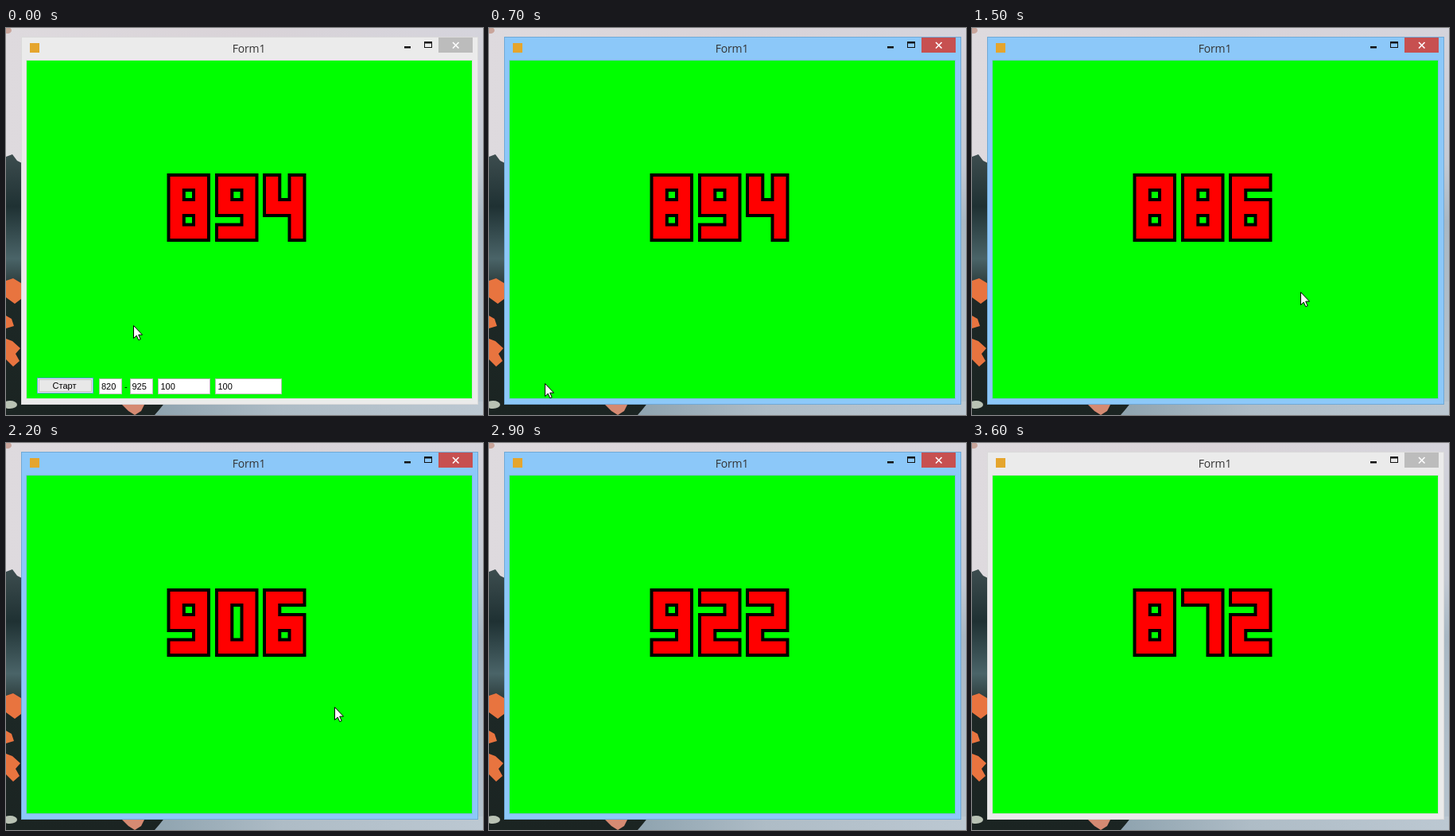
These frames come from a looping animation (600x487 px, 3.7 s). An HTML page:

```html
<!DOCTYPE html>
<html lang="ru">
<head>
<meta charset="utf-8">
<title>Form1</title>
<style>
  html, body { margin: 0; width: 100%; height: 100%; overflow: hidden; background: #d6d4da; }
  svg { display: block; width: 600px; height: 487px; }
  text { font: 11px "Liberation Sans", Arial, sans-serif; fill: #000; }
  .title { font: 14px "Open Sans", "Noto Sans", sans-serif; letter-spacing: -.2px; fill: #333; text-anchor: middle; }
  .frame { fill: #ebebeb; stroke: #dadada; }
  .client { fill: #0f0; stroke: #dedede; }
  .close { fill: #bcbcbc; }
  .active .frame { fill: #8cc8f9; stroke: #70a9d6; }
  .active .client { stroke: #7fbce6; }
  .active .close { fill: #c75050; }
  #digits path { fill: #f00; fill-rule: evenodd; stroke: #000; stroke-width: 4; }
  .box { fill: #fff; stroke: #b4bcb4; }
</style>
</head>
<body>
<svg viewBox="0 0 600 487">
  <defs>
    <linearGradient id="sky" x1="0" x2="1" y1="0" y2="0">
      <stop offset="0" stop-color="#dedade"/>
      <stop offset=".5" stop-color="#d9d3d8"/>
      <stop offset="1" stop-color="#d5d4dc"/>
    </linearGradient>
    <linearGradient id="sea" x1="0" x2="0" y1="0" y2="1">
      <stop offset="0" stop-color="#d5d4dc"/>
      <stop offset=".35" stop-color="#c3c9d3"/>
      <stop offset=".5" stop-color="#a9b8c4"/>
      <stop offset="1" stop-color="#b6c3ce"/>
    </linearGradient>
    <linearGradient id="water" x1="0" x2="1" y1="0" y2="0">
      <stop offset="0" stop-color="#8da2ae"/>
      <stop offset=".4" stop-color="#aebcc6"/>
      <stop offset="1" stop-color="#bcc8d2"/>
    </linearGradient>
    <linearGradient id="shore" x1="0" x2="0" y1="0" y2="1">
      <stop offset="0" stop-color="#3d4d4f"/>
      <stop offset=".2" stop-color="#1f3133"/>
      <stop offset=".4" stop-color="#4a6468"/>
      <stop offset=".55" stop-color="#1d2826"/>
      <stop offset="1" stop-color="#1b2422"/>
    </linearGradient>
  </defs>

  <rect width="600" height="487" fill="url(#sky)"/>
  <rect x="590" width="10" height="487" fill="url(#sea)"/>
  <rect x="180" y="470" width="420" height="17" fill="url(#water)"/>
  <path d="M0 162l8-3 6 8 8 4V470H201l-8 10-6 7H0z" fill="url(#shore)"/>
  <g fill="#e8743f">
    <path d="M0 318l9-3 10 6v20l-8 6-11-8zM0 362l7 4 3 9-10 3zM0 391l8 3 10 9-6 7 5 9-8 7-9-9z"/>
    <path d="M146 474h28l-4 8-8 5-8-5z" fill="#d58a72"/>
  </g>
  <g fill="#b9c2b4">
    <ellipse cx="5" cy="474" rx="9" ry="5"/>
    <ellipse cx="2" cy="3" rx="5" ry="4" fill="#c9a59b"/>
  </g>

  <g id="win">
    <rect class="frame" x="19.5" y="11.5" width="574" height="462"/>
    <rect class="client" x="25.5" y="40.5" width="561" height="426"/>
    <rect x="30" y="19" width="12" height="12" fill="#e5a52d"/>
    <text class="title" x="305.5" y="31">Form1</text>
    <path d="M501 23h8v2.5h-8z" fill="#111"/>
    <path d="M526 17h10v8h-10zM527 19.5v4.5h8v-4.5z" fill="#111" fill-rule="evenodd"/>
    <rect class="close" x="544" y="12" width="43" height="19"/>
    <path d="M562 18l7.5 7.5M569.5 18l-7.5 7.5" stroke="#fff" stroke-width="1.6"/>
  </g>

  <g id="controls">
    <rect x="39.5" y="440.5" width="70" height="19" fill="#e8e8e8" stroke="#5aa5dc"/>
    <rect x="41.5" y="442.5" width="66" height="15" fill="none" stroke="#999" stroke-dasharray="1 1"/>
    <text x="73.5" y="454" text-anchor="middle">Старт</text>
    <text x="149" y="455">-</text>
    <rect class="box" x="117.5" y="441.5" width="28" height="19"/>
    <rect class="box" x="156.5" y="441.5" width="28" height="19"/>
    <rect class="box" x="191.5" y="441.5" width="65" height="19"/>
    <rect class="box" x="263.5" y="441.5" width="83" height="19"/>
    <text x="120" y="455">820</text>
    <text x="158.5" y="455">925</text>
    <text x="194.5" y="455">100</text>
    <text x="266.5" y="455">100</text>
  </g>

  <g id="digits">
    <path transform="translate(202.5 183)"/>
    <path transform="translate(263 183)"/>
    <path transform="translate(323 183)"/>
  </g>
  <path id="cursor" d="M.5.5v16l3.7-3.4 2.6 5.6 2.4-1.1-2.5-5.5h4.8z" fill="#fff" stroke="#000"/>
</svg>

<script>
const $ = id => document.getElementById(id);
const win = $('win'), controls = $('controls'), cursor = $('cursor');
const digits = $('digits').children;

// Glyph outlines as column/row pairs on a 4 by 6 grid.
const X = [2, 21.3, 33.5, 52.5], Y = [2, 21, 33, 53, 64.5, 84];
const FRAME = '00 30 35 05';
const TOP = '11 21 22 12', LOW = '13 23 24 14';
const GLYPHS = [
  [FRAME, '11 21 24 14'],
  ['00 20 24 34 35 05 04 14 11 01'],
  ['00 30 33 13 14 34 35 05 02 22 21 01'],
  ['00 30 35 05 04 24 23 03 02 22 21 01'],
  ['00 10 12 22 20 30 35 25 23 03'],
  ['00 30 31 11 12 32 35 05 04 24 23 03'],
  ['00 30 31 11 12 32 35 05', LOW],
  ['00 30 35 25 21 01'],
  [FRAME, TOP, LOW],
  ['00 30 35 05 04 24 23 03', TOP]
].map(loops => loops.map(loop =>
  'M' + loop.split(' ').map(([c, r]) => X[c] + ' ' + Y[r]).join('L') + 'Z').join(''));

const STEP = 100, LOOP = 3700;
const START = 8, ACTIVATE = 5, HIDE = 6, BLUR = 36;
const rolls = [851, 917, 838, 902, 864, 920, 843, 886, 915, 858, 890, 834, 834, 875, 906,
  829, 897, 860, 823, 908, 845, 922, 867, 893, 836, 907, 880, 854, 872];

// Pointer positions as [step, x, y]; it leaves at GONE.
const path = [[1, 160, 374], [2, 148, 383], [4, 88, 436], [5, 70, 447], [8, 70, 447],
  [9, 64, 468], [10, 90, 460], [13, 340, 348], [15, 413, 332], [22, 413, 332], [24, 464, 346]];
const GONE = 25;

function pointer(step) {
  const i = path.findIndex(p => p[0] >= step);
  if (i < 1) return path[i < 0 ? path.length - 1 : 0].slice(1);
  const [s0, x0, y0] = path[i - 1], [s1, x1, y1] = path[i];
  const k = (step - s0) / (s1 - s0);
  return [Math.round(x0 + (x1 - x0) * k), Math.round(y0 + (y1 - y0) * k)];
}

function show(el, on) { el.style.display = on ? '' : 'none'; }

function draw(step) {
  const value = step < START ? 894 : rolls[step - START];
  [...String(value)].forEach((d, i) => digits[i].setAttribute('d', GLYPHS[d]));
  win.classList.toggle('active', step >= ACTIVATE && step < BLUR);
  show(controls, step < HIDE);
  show(cursor, step < GONE);
  cursor.setAttribute('transform', `translate(${pointer(step)})`);
}

const begin = performance.now();
let last = -1;
function tick() {
  const step = Math.floor((performance.now() - begin) % LOOP / STEP);
  if (step !== last) draw(last = step);
  requestAnimationFrame(tick);
}
tick();
</script>
</body>
</html>
```
